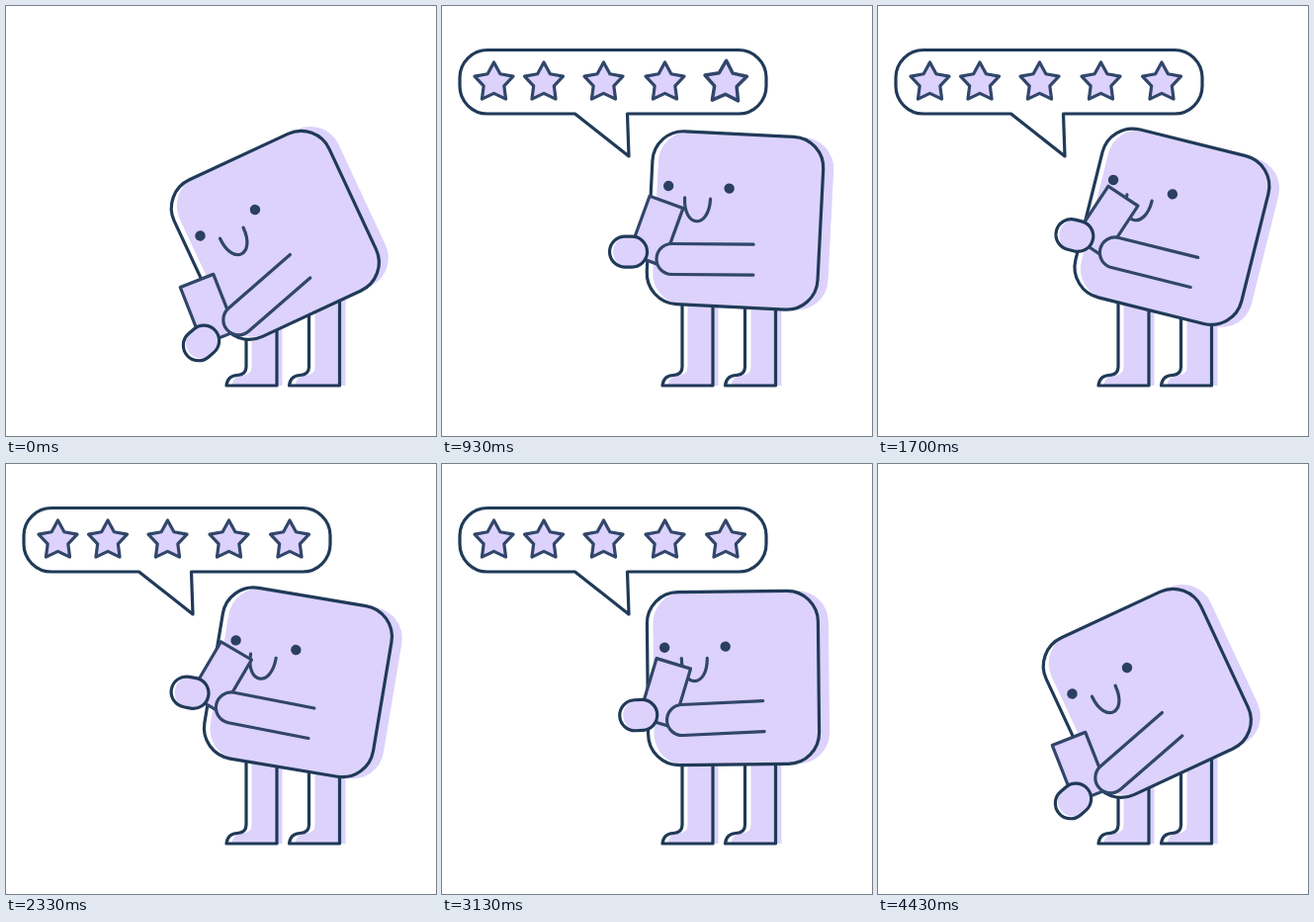
Write an HTML page that moves like this. It is 435 px wide and 435 px high and loops after 5.76 s.

```html
<!DOCTYPE html>
<html lang="en">
<head>
<meta charset="utf-8">
<title>Five-star review</title>
<style>
  html, body { margin: 0; width: 100%; height: 100%; overflow: hidden; background: #fff; }
  svg { display: block; width: 100%; height: 100%; }
  .line { fill: none; stroke: #203a58; stroke-width: 3.2; stroke-linejoin: round; stroke-linecap: round; }
  .soft { stroke: #31466a; }
  .tint { fill: #dcd2fc; }
  .paper { fill: #fff; }
  .dot { fill: #2a3f62; }
</style>
</head>
<body>
<svg viewBox="0 0 435 435">
  <defs>
    <path id="leg" d="M31 290V384H-20Q-19 374-9 373.500Q0 373 0 365V290"/>
    <rect id="torso" x="-87.500" y="-87" width="173" height="175" rx="31.500"/>
  </defs>

  <g id="bubble">
    <path class="line paper" d="M46 44.500H300A28 28 0 0 1 328 72V81A28 28 0 0 1 300 109H187.500L189 152L134.500 109H46A28 28 0 0 1 18 81V72A28 28 0 0 1 46 44.500Z"/>
    <g id="stars"></g>
  </g>

  <g id="legs">
    <use href="#leg" x="248.500" class="tint"/>
    <use href="#leg" x="312.500" class="tint"/>
    <use href="#leg" x="243" class="line"/>
    <use href="#leg" x="306.500" class="line"/>
  </g>

  <g id="body">
    <use href="#torso" class="paper"/>
    <rect class="tint" x="-81.500" y="-87" width="177.500" height="175" rx="31.500"/>
    <use href="#torso" class="line"/>
    <circle class="dot" cx="-70" cy="-31" r="5.200"/>
    <circle class="dot" cx="-8.500" cy="-31.500" r="5.200"/>
    <path class="line soft" d="M-53-20C-53 11-27 11-27-20"/>
  </g>

  <g id="arms">
    <rect class="line tint soft" width="36" height="62" transform="translate(-23 -63) rotate(19.500)"/>
    <rect class="paper" x="-63" y="-22" width="38" height="31" rx="15.500"/>
    <rect class="tint" x="-59.500" y="-22" width="34.500" height="31" rx="15.500"/>
    <rect class="line" x="-63" y="-22" width="38" height="31" rx="15.500"/>
    <path class="line tint soft" d="M82.500-15H0A15.500 15.500 0 0 0 0 16H82.500"/>
  </g>
</svg>

<script>
const LOOP = 5760, LAST_STEP = 76;
const byId = id => document.getElementById(id);
const clamp01 = v => Math.min(1, Math.max(0, v));

// step, body x, y, angle, arms x, y, angle
const rest = [273, 231, -25, 235, 317, -41];
const poses = [
  [0, ...rest],
  [10, 290.5, 217, 5, 213.5, 251.5, 3.2],
  [19, 297.5, 216.5, 2.9, 232.5, 255.5, 0.5],
  [34, 298.5, 223, 14, 240, 249, 14],
  [47, 296.5, 220.5, 9.5, 228, 246, 11],
  [63, 295.5, 216, -0.6, 243, 258.5, -2.7],
  [LAST_STEP, ...rest]
];

const slope = (i, c) => (poses[i + 1][c] - poses[i][c]) / (poses[i + 1][0] - poses[i][0]);

// Flat at turning points, harmonic mean of neighbouring slopes elsewhere.
function tangent(i, c) {
  if (i === 0 || i === poses.length - 1) return 0;
  const a = slope(i - 1, c), b = slope(i, c);
  return a * b > 0 ? 2 * a * b / (a + b) : 0;
}

function poseValue(step, c) {
  let i = 0;
  while (i < poses.length - 2 && step >= poses[i + 1][0]) i++;
  const [from, to] = [poses[i], poses[i + 1]];
  const span = to[0] - from[0], p = (step - from[0]) / span, q = 1 - p;
  return q * q * (1 + 2 * p) * from[c] + p * p * (3 - 2 * p) * to[c]
    + span * p * q * (q * tangent(i, c) - p * tangent(i + 1, c));
}

function starPath(radius) {
  const points = Array.from({ length: 10 }, (_, i) => {
    const a = i * Math.PI / 5, r = i % 2 ? radius * 0.53 : radius;
    return `${(r * Math.sin(a)).toFixed(2)} ${(-r * Math.cos(a)).toFixed(2)}`;
  });
  return `M${points.join("L")}Z`;
}

const starX = [52.5, 103, 163.5, 225.5, 287];
const stars = starX.map(() => {
  const star = document.createElementNS("http://www.w3.org/2000/svg", "path");
  star.setAttribute("d", starPath(20.5));
  star.setAttribute("class", "line tint soft");
  return byId("stars").appendChild(star);
});

function pop(p) {
  const u = clamp01(p) - 1;
  return p <= 0 ? 0 : 1 + 2.7 * u ** 3 + 1.7 * u ** 2;
}

function place(node, x, y, angle, scale = 1) {
  node.setAttribute("transform", `translate(${x} ${y}) rotate(${angle}) scale(${scale})`);
}

function draw(time) {
  // Steps alternate between 30 ms and 70 ms.
  const step = Math.min(LAST_STEP, 2 * Math.floor(time / 100) + (time % 100 >= 30 ? 1 : 0));
  const at = c => poseValue(step, c);
  place(byId("body"), at(1), at(2), at(3));
  place(byId("arms"), at(4), at(5), at(6));

  const open = Math.min(clamp01((step - 3) / 8), clamp01((71 - step) / 5));
  const size = 1 - (1 - open) ** 2;
  const bubble = byId("bubble");
  bubble.style.display = size ? "" : "none";
  bubble.setAttribute("transform",
    `translate(189 152) rotate(${60 * (1 - size)}) scale(${size}) translate(-189 -152)`);

  stars.forEach((star, i) => {
    const s = pop((step - 7.1 - 2.3 * i) / 4);
    star.style.display = s ? "" : "none";
    place(star, starX[i], 77.5, 20 * (s - 1), s);
  });
}

const start = performance.now();
function tick() {
  draw((performance.now() - start) % LOOP);
  requestAnimationFrame(tick);
}
tick();
</script>
</body>
</html>
```
